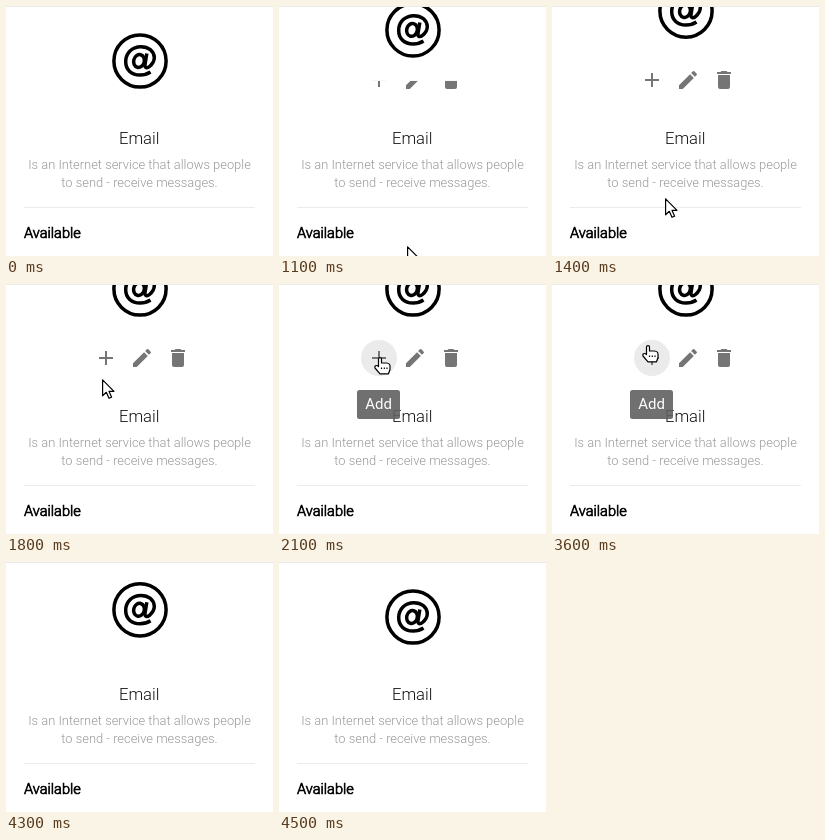
Write an HTML page that moves like this. It is 267 by 250 pixels and loops after 5300 ms.

```html
<!DOCTYPE html>
<html lang="en">
<head>
<meta charset="utf-8">
<title>Email card</title>
<style>
  html, body { margin: 0; width: 100%; height: 100%; overflow: hidden; background: #fff; }
  svg { display: block; width: 267px; height: 250px; font-family: Roboto, sans-serif; }
  .title { font-size: 16.6px; font-weight: 300; fill: #111; }
  .about { font-size: 12.9px; font-weight: 300; fill: #999; }
  .status { font-size: 14.6px; font-weight: 300; fill: #000; stroke: #000; stroke-width: .7; }
  .pointer { fill: #fff; stroke: #000; stroke-width: 1.2; stroke-linejoin: round; }
</style>
</head>
<body>
<svg viewBox="0 0 267 250">
  <defs><clipPath id="card"><rect y="1" width="267" height="249"/></clipPath></defs>
  <path d="M0 .5H267" stroke="#ebebeb"/>

  <circle id="hover" cx="100" cy="74" r="18" fill="#ebebeb"/>
  <g fill="#757575">
    <path transform="translate(88 62)" d="M19 13h-6v6h-2v-6H5v-2h6V5h2v6h6z"/>
    <path transform="translate(124 62)" d="M3 17.25V21h3.75L17.81 9.94l-3.75-3.75zM20.71 7.04a1 1 0 0 0 0-1.41l-2.34-2.34a1 1 0 0 0-1.41 0l-1.83 1.83 3.75 3.75z"/>
    <path transform="translate(160 62)" d="M6 19a2 2 0 0 0 2 2h8a2 2 0 0 0 2-2V7H6zM19 4h-3.5l-1-1h-5l-1 1H5v2h14z"/>
  </g>

  <!-- The opaque icon panel slides up to uncover the buttons. -->
  <g clip-path="url(#card)">
    <g id="panel">
      <rect x="84" y="5" width="100" height="101" fill="#fff"/>
      <g fill="none" stroke="#000" stroke-width="3.5">
        <circle cx="134" cy="55" r="26.1"/>
        <ellipse cx="133" cy="55" rx="5.3" ry="6.500" transform="rotate(15 133 55)"/>
        <path d="M140.800 47.500L139 58.500C138.600 62 141 62.500 143.500 60.500C146.500 58 148.300 55 148.300 51.500C148 45 142.500 40.700 135 40.700C126 40.700 119.700 47 119.700 55.500C119.700 64 125.500 69 134 69C138 69 141.500 68 144.500 66"/>
      </g>
    </g>
  </g>

  <g text-anchor="middle">
    <text class="title" x="133.200" y="138">Email</text>
    <text class="about" x="133.500" y="163">Is an Internet service that allows people</text>
    <text class="about" x="133.500" y="181">to send - receive messages.</text>
  </g>
  <path d="M18 201.500H249" stroke="#ebebeb"/>
  <text class="status" x="18" y="232">Available</text>

  <g id="tooltip">
    <rect x="78" y="106" width="43" height="29" rx="2.500" fill="#616161" fill-opacity=".9"/>
    <text x="99.500" y="125" font-size="15" fill="#fff" text-anchor="middle">Add</text>
  </g>

  <path id="arrow" class="pointer" d="M.6 .8V16.800L4.300 13.300L7 19.300L9.600 18.200L7 12.300H12z"/>
  <g id="hand" class="pointer">
    <path d="M4.500 9.500V2Q4.500 .6 6 .6T7.500 2V6H12.500Q16 6.500 16 9V12.500L14.500 16.800H6L1 11Q.4 8.500 2.500 8.500Q3.500 8.500 4.500 9.500z"/>
    <path d="M7.500 10.500V12M10.300 10.500V12M13 10.500V12" fill="none"/>
  </g>
</svg>
<script>
const LOOP = 5300, STEP = 100, LIFT = 50;
const part = id => document.getElementById(id);
const [hover, panel, tooltip, arrow, hand] =
  ['hover', 'panel', 'tooltip', 'arrow', 'hand'].map(part);
const clamp = v => Math.max(0, Math.min(1, v));
const show = (el, on) => el.setAttribute('visibility', on ? 'visible' : 'hidden');
const move = (el, x, y) => el.setAttribute('transform', `translate(${x} ${y})`);

// Pointer path: time, x, y
const path = [
  [1100, 128, 240], [1400, 113, 192], [1600, 101, 141], [1700, 98, 117],
  [1800, 96, 95], [1900, 95, 82], [2100, 95, 73], [3500, 95, 73],
  [3600, 90, 61], [3700, 89, 54], [3900, 89, 43], [4000, 88, 28], [4100, 86, 13]
];

// Standard CSS "ease" curve, solved by bisection
function ease(t) {
  let low = 0, high = 1, s = .5;
  for (let i = 0; i < 20; i++) {
    s = (low + high) / 2;
    if (.75 * s * (1 - s) + s ** 3 < t) low = s; else high = s;
  }
  return .3 * s * (1 - s) ** 2 + 3 * s * s * (1 - s) + s ** 3;
}

function pointerAt(t) {
  const i = Math.max(1, path.findIndex(p => p[0] >= t));
  const a = path[i - 1], b = path[i];
  const k = (t - a[0]) / (b[0] - a[0]);
  return [1, 2].map(n => Math.round(a[n] + (b[n] - a[n]) * k));
}

function lift(t) {
  if (t < 1100 || t >= 4500) return 0;
  if (t < 4200) return LIFT * ease(clamp((t - 920) / 500));
  return LIFT * (1 - ease(clamp((t - 4020) / 500)));
}

function draw(now) {
  const t = Math.floor(now % LOOP / STEP) * STEP;
  move(panel, 0, -lift(t));

  const present = t >= 1100 && t < 4200;
  const hovering = t >= 1900 && t < 3700;
  show(arrow, present && !hovering);
  show(hand, hovering);
  show(hover, hovering);
  if (present) {
    const [x, y] = pointerAt(t);
    move(arrow, x, y);
    move(hand, x, y);
  }

  // The tooltip grows in from its top edge and fades out in place.
  const grown = clamp((t - 1800) / 300);
  tooltip.setAttribute('opacity', Math.min(grown, clamp((3800 - t) / 200)));
  tooltip.setAttribute('transform', `translate(99.5 106) scale(${grown}) translate(-99.5 -106)`);
}

const start = performance.now();
function frame() {
  draw(performance.now() - start);
  requestAnimationFrame(frame);
}
frame();
</script>
</body>
</html>
```
